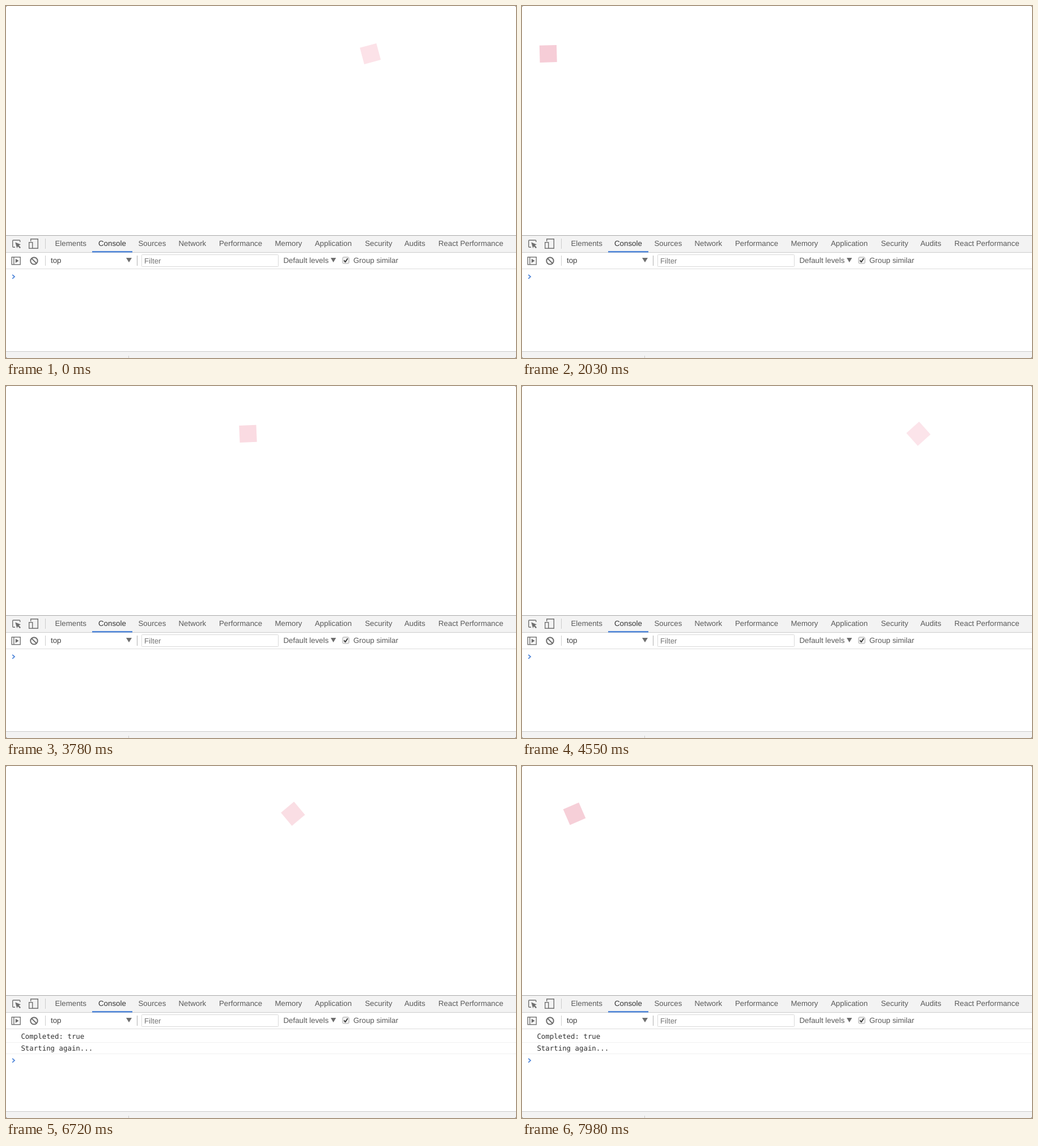
Recreate the animation shown at these times as an HTML page. Size 900 px wide and 622 px high, loop 8000 ms.

```html
<!DOCTYPE html>
<html lang="en">
<head>
<meta charset="utf-8">
<title>Moving square and console</title>
<style>
  html, body { margin: 0; width: 100%; height: 100%; overflow: hidden; background: #fff; }
  svg { display: block; }
  text { font: 13.3px "Liberation Sans", Arial, sans-serif; fill: #5a5a5a; text-rendering: geometricPrecision; }
  .log text { font: 12.4px "DejaVu Sans Mono", monospace; fill: #303030; }
  .icon { fill: none; stroke: #6e6e6e; stroke-width: 1.4; }
  .solid { fill: #6e6e6e; }
  .rule { fill: none; stroke: #ccc; }
</style>
</head>
<body>
<svg width="900" height="622" viewBox="0 0 900 622">
  <rect width="900" height="622" fill="#fff"/>
  <rect id="square" x="-15.1" y="-15.1" width="30.2" height="30.2"/>

  <rect y="405" width="900" height="30" fill="#f3f3f3"/>
  <path class="rule" d="M0 405.5H900" style="stroke:#a8a8a8"/>
  <path class="rule" d="M0 435.5H900M69.5 411V429M69.5 441V459"/>
  <path class="rule" d="M0 464.5H900" style="stroke:#ddd"/>
  <rect x="152" y="433" width="71" height="2.5" fill="#4f86d9"/>
  <g id="tabs"></g>

  <path class="icon" d="M16 426.3H13.2Q11.7 426.3 11.7 424.8V415.2Q11.7 413.7 13.2 413.7H23.3Q24.8 413.7 24.8 415.2V417"/>
  <path class="solid" d="M16.3 417.5L26 421.5L22.6 423L26 426.6L24.4 428.2L21 424.7L19.3 428Z"/>
  <path class="icon" d="M43.7 416V411.7H56.3V428.3H47"/>
  <rect class="icon" x="40.7" y="417.7" width="6" height="10.6"/>

  <rect class="icon" x="10.2" y="443.7" width="15" height="13.2"/>
  <path class="icon" d="M13.8 444V457"/>
  <path class="solid" d="M16.8 446.5L22.6 450.3L16.8 454.1Z"/>
  <g class="icon" style="stroke-width:2">
    <circle cx="49.5" cy="450.4" r="6.2"/>
    <path d="M45.2 446.1L53.8 454.7"/>
  </g>
  <text x="79" y="454.3" style="fill:#444">top</text>
  <path class="solid" d="M212 445H222L217 453ZM573 445H582.4L577.7 453Z"/>
  <path class="rule" d="M231.5 441V459" style="stroke:#b0b0b0"/>
  <rect x="239.5" y="439.5" width="241" height="21" rx="1" fill="#fff" stroke="#d8d8d8"/>
  <text x="244" y="455" style="fill:#757575">Filter</text>
  <text x="489.5" y="454.3">Default levels</text>
  <rect x="594" y="443.8" width="11.2" height="11.2" rx="2" fill="#f2f2f2" stroke="#a5a5a5"/>
  <path d="M596.3 449.5L598.8 452.3L603 446" fill="none" stroke="#3a3a3a" stroke-width="1.9"/>
  <text x="613" y="454.3">Group similar</text>

  <g class="log" id="log">
    <path class="rule" d="M0 488.5H900M0 508.5H900" style="stroke:#f0f0f0"/>
    <text x="26.4" y="482.4">Completed: true</text>
    <text x="26.4" y="502.8">Starting again...</text>
  </g>
  <g id="prompt">
    <path d="M11.2 474.8L15 478.3L11.2 481.8" fill="none" stroke="#4f86d9" stroke-width="1.8"/>
    <rect id="caret" x="26" y="471" width="1.4" height="14" fill="#333"/>
  </g>

  <rect y="610" width="900" height="12" fill="#f3f3f3"/>
  <path class="rule" d="M0 610.5H900M216.5 618V622"/>
  <path d="M0 0H2L0 2ZM900 0V2L898 0ZM0 622V620L2 622ZM900 622H898L900 620Z" fill="#999"/>
</svg>
<script>
const LOOP = 8000, STEP = 70, LOG_AT = 5460, CARET_AT = 2800, BLINK = 525;
const LEFT = 43.1, RIGHT = 800.9, MID_Y = 84.4;
// Crossings: start and length in ms; they alternate leftward and rightward.
const legs = [[-980, 3150], [2212, 3111], [5336, 3200]];
const $ = id => document.getElementById(id);

const tabs = { Elements: 86.5, Console: 163, Sources: 233.5, Network: 304.5, Performance: 376,
  Memory: 474.5, Application: 545, Security: 633.5, Audits: 703, 'React Performance': 763 };
$('tabs').innerHTML = Object.entries(tabs).map(([name, x]) =>
  `<text x="${x}" y="424.3"${name === 'Console' ? ' style="fill:#333"' : ''}>${name}</text>`).join('');

// cubic-bezier(.4, 0, .6, 1), solved by bisection
function ease(t) {
  let low = 0, high = 1, s;
  for (let i = 0; i < 24; i++) {
    s = (low + high) / 2;
    if (1.2 * s - .6 * s * s + .4 * s ** 3 < t) low = s; else high = s;
  }
  return 3 * s * s - 2 * s ** 3;
}

const mix = (a, b, k) => a + (b - a) * k;

function draw(time) {
  const i = legs.findLastIndex(([start]) => time >= start);
  const [start, length] = legs[i];
  const done = ease(Math.min(1, (time - start) / length));
  const right = i % 2 ? done : 1 - done;
  const square = $('square');
  square.setAttribute('transform',
    `translate(${mix(LEFT, RIGHT, right)} ${MID_Y}) rotate(${-360 * right})`);
  square.setAttribute('fill',
    `rgb(${mix(246, 253, right)},${mix(205, 232, right)},${mix(215, 237, right)})`);

  const logged = time >= LOG_AT;
  $('log').style.display = logged ? '' : 'none';
  $('prompt').setAttribute('transform', `translate(0 ${logged ? 42 : 0})`);
  const caretOn = time >= CARET_AT && Math.floor((time - CARET_AT) / BLINK) % 2 === 0;
  $('caret').style.display = caretOn ? '' : 'none';
}

const origin = performance.now();
function tick() {
  const time = (performance.now() - origin) % LOOP;
  draw(Math.floor(time / STEP) * STEP);
  requestAnimationFrame(tick);
}
tick();
</script>
</body>
</html>
```
